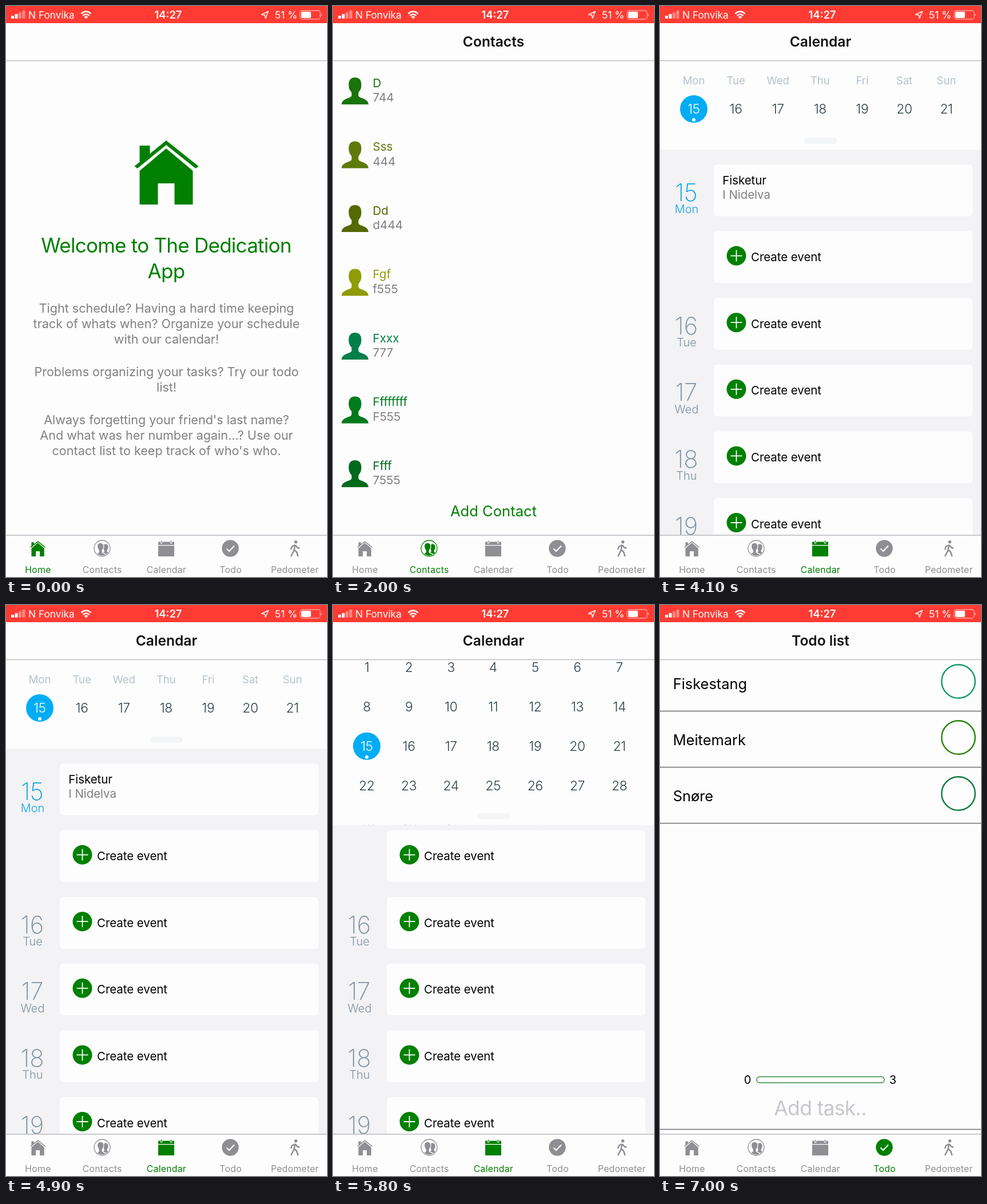
Recreate the animation shown at these times as an HTML page. Size 561 by 998 pixels, loop 8000 ms.

```html
<!DOCTYPE html>
<html lang="en">
<head>
<meta charset="utf-8">
<title>Phone app tour</title>
<style>
  html, body { margin: 0; width: 100%; height: 100%; overflow: hidden; background: #fff; }
  svg { display: block; width: 100vw; height: 100vh; }
  text { font-family: Inter, Roboto, sans-serif; font-optical-sizing: none; white-space: pre; }
</style>
</head>
<body>
<svg id="stage" viewBox="0 0 561 998"></svg>
<script>
const GREEN = '#008000', GREY = '#8e8e93', BLUE = '#00adf5', WHITE = '#fefdfe', RULE = '#6d6d72';
const LOOP = 8000, STEP = 100;
const DAYS = ['Mon', 'Tue', 'Wed', 'Thu', 'Fri', 'Sat', 'Sun'];

const text = (s, x, y, size, fill, { anchor = 'start', weight = 400, spacing = 0 } = {}) =>
  `<text x="${x}" y="${y}" font-size="${size}" fill="${fill}" text-anchor="${anchor}" font-weight="${weight}" letter-spacing="${spacing}">${s}</text>`;
const centered = (s, x, y, size, fill, options) => text(s, x, y, size, fill, { anchor: 'middle', ...options });
const rect = (x, y, w, h, fill, extra = '') =>
  `<rect x="${x}" y="${y}" width="${w}" height="${h}" fill="${fill}" ${extra}/>`;
const circle = (x, y, r, fill, extra = '') => `<circle cx="${x}" cy="${y}" r="${r}" fill="${fill}" ${extra}/>`;
const path = (d, fill, extra = '') => `<path d="${d}" fill="${fill}" ${extra}/>`;
const line = (d, stroke, width, extra = '') => path(d, 'none', `stroke="${stroke}" stroke-width="${width}" ${extra}`);
const place = (x, y, scale, content) => `<g transform="translate(${x} ${y}) scale(${scale})">${content}</g>`;
const group = (id, content) => `<g id="${id}">${content}</g>`;
const each = (list, draw) => list.map(draw).join('');
const range = n => [...Array(n).keys()];

const house = fill => path('M0 45L55.500 0L112 45L107 49L55.500 8L5 49ZM9 9H27V24L9 38Z'
  + 'M9 53L55.500 14L102 53V112H70V75H41V112H9Z', fill);
const person = (fill, extra) => path('M23.500 0C15 0 12 6 12.500 14c.3 6 2.500 9 5 12v6c-2 5-17 4-17.500 15h47'
  + 'c-.5-11-15.500-10-17.500-15v-6c2.500-3 4.700-6 5-12C35 6 32 0 23.500 0z', fill, extra);

function statusBar() {
  const bars = each(range(4), i => {
    const h = 5 + i * 3;
    return rect(9 + i * 6.5, 22 - h, 5, h, '#fff', `rx="1" opacity="${i < 2 ? 1 : 0.4}"`);
  });
  const wifi = line('M131.500 13.500Q140 5.500 148.500 13.500M134.500 17Q140 12 145.500 17', '#fff', 2.5)
    + path('M136.500 19Q140 16 143.500 19L140 22.500Z', '#fff');
  const battery = rect(514, 8, 35, 15, 'none', 'rx="4" stroke="#fff" stroke-opacity=".55" stroke-width="1.3"')
    + rect(516, 10, 17, 11, '#fff', 'rx="2"') + path('M550.500 13q3 2.500 0 5z', '#fff', 'opacity=".6"');
  return rect(0, 0, 561, 30, '#ff3b33') + bars + wifi + battery
    + line('M446.500 15L458.500 9.500L453.500 21.500L452.500 16Z', '#fff', 1.4, 'stroke-linejoin="round"')
    + text('N Fonvika', 39, 22, 17.3, '#fff')
    + centered('14:27', 283.5, 22, 18.4, '#fff', { weight: 600 })
    + text('51 %', 470, 22, 17.3, '#fff');
}

function home() {
  const body = [
    [536, 'Tight schedule? Having a hard time keeping'],
    [563, 'track of whats when? Organize your schedule'],
    [590, 'with our calendar!'],
    [647, 'Problems organizing your tasks? Try our todo'],
    [674, 'list!'],
    [731, "Always forgetting your friend's last name?"],
    [758, 'And what was her number again...? Use our'],
    [785, "contact list to keep track of who's who."],
  ];
  const heading = { spacing: -0.75 };
  return place(224.5, 235, 1, house(GREEN))
    + centered('Welcome to The Dedication', 280, 431, 35, GREEN, heading)
    + centered('App', 280, 476, 35, GREEN, heading)
    + each(body, ([y, s]) => centered(s, 280.5, y, 21.55, '#808080'));
}

function contacts() {
  const people = [
    ['D', '744', '#1a730b'], ['Sss', '444', '#5e7a0a'], ['Dd', 'd444', '#566800'],
    ['Fgf', 'f555', '#8f9c08'], ['Fxxx', '777', '#008048'], ['Ffffffff', 'F555', '#007a1c'],
    ['Ffff', '7555', '#006a1c'],
  ];
  return each(people, ([name, number, color], i) => place(0, 125 + i * 111.5, 1,
      place(15, 0, 1, person(color)) + text(name, 69.5, 16.5, 20.6, color) + text(number, 69.5, 42, 20.6, '#808080')))
    + centered('Add Contact', 280.5, 891.5, 25.6, GREEN);
}

function agenda() {
  const dayLabel = (date, name, color) =>
    centered(date, 46, 63.5, 42, color, { weight: 200 }) + centered(name, 46.5, 85, 20, color, { weight: 300 });
  const createEvent = circle(133.5, 43, 17, GREEN) + line('M123.500 43h20M133.500 33v20', '#fff', 1.8)
    + text('Create event', 159, 52.5, 20.4, '#000');
  const fishing = text('Fisketur', 109.2, 34.5, 20.4, '#000') + text('I Nidelva', 109.2, 60, 20.4, '#808080');
  const labels = [0, null, 1, 2, 3, 4];
  return rect(0, 96, 561, 830, '#f3f2f5') + each(labels, (day, i) => place(0, 277 + i * 116.6, 1,
    rect(94, 0, 452, 90.5, WHITE, 'rx="6"') + (i ? createEvent : fishing)
    + (day === null ? '' : dayLabel(15 + day, DAYS[day], day ? '#7d929f' : '#0ea7e0'))));
}

function monthPanel() {
  const column = i => 59 + i * 73.6;
  const weekdays = y => each(DAYS, (d, i) => centered(d, column(i), y, 18.5, '#b6c1cd'));
  const dates = each(range(35), i => {
    const x = column(i % 7), y = 180 + (Math.floor(i / 7) - 2) * 68.8, today = i === 14;
    const color = today ? '#fff' : i < 31 ? '#2d4048' : '#d9e1e8';
    return (today ? circle(x, y, 24, BLUE) + circle(x, y + 19, 3, '#fff') : '')
      + centered(i % 31 + 1, x, y + 8.3, 22.8, color, { weight: 300, spacing: -0.3 });
  });
  return `<clipPath id="panelClip"><rect id="panelArea" x="0" y="96" width="561" height="155"/></clipPath>
    <g clip-path="url(#panelClip)">${rect(0, 96, 561, 830, WHITE)}
      ${group('month', weekdays(-7.5) + dates)}
      ${group('weekBar', rect(0, 96, 561, 54, WHITE) + weekdays(137))}
      ${group('knob', rect(0, 215, 561, 37, WHITE) + rect(252, 230.5, 57, 10.5, '#f2f4f5', 'rx="5" id="handle"'))}
    </g>`;
}

function todo() {
  const tasks = [['Fiskestang', '#109a6c'], ['Meitemark', '#258208'], ['Snøre', '#0a7a3c']];
  return each(tasks, ([name, color], i) => place(0, 98 * i, 1,
      text(name, 22.7, 146.5, 25.4, '#000')
      + circle(521.5, 133.5, 29.3, 'none', `stroke="${color}" stroke-width="2.4"`)
      + line('M0 185.500H561', RULE, 1.5)))
    + centered('0', 153, 837, 20, '#000') + centered('3', 407, 837, 20, '#000')
    + rect(169, 824.5, 223, 10.5, 'none', 'rx="5" stroke="#2f8a3a" stroke-width="1.4"')
    + centered('Add task..', 280, 892, 35.5, '#c7c7cd', { spacing: -0.7 })
    + line('M0 916.500H561', RULE, 1.5);
}

function tabBar() {
  const ink = 'currentColor';
  const icons = [
    place(42.3, 935, 0.24, house(ink)),
    `<clipPath id="badge">${circle(168, 948, 12.6, '#000')}</clipPath>`
      + circle(168, 948, 14, 'none', `stroke="${ink}" stroke-width="1.3"`)
      + `<g clip-path="url(#badge)">${place(164.5, 940.5, 0.41, person(ink))}
        ${place(153, 938, 0.52, person(ink, 'stroke="#fff" stroke-width="2.500"'))}</g>`,
    rect(266, 936.5, 28, 5.5, ink) + rect(266, 943.3, 28, 18.7, ink)
      + line('M271.500 934.500v5M288.500 934.500v5', '#fff', 3.4) + line('M271.500 934.500v4M288.500 934.500v4', ink, 1.6),
    circle(392, 948, 14.7, ink) + line('M385.500 948.500L390 953L399 943.500', '#fff', 2.2),
    circle(506.5, 936.7, 2.7, ink) + line('M505 942L503.500 951L498 962M503.500 950L508 954.500L510.500 962'
      + 'M505 942L499.500 945L498 950M505.500 942L509 946.500L513 948', ink, 2.5, 'stroke-linejoin="round"'),
  ];
  const names = ['Home', 'Contacts', 'Calendar', 'Todo', 'Pedometer'];
  return rect(0, 925, 561, 73, WHITE) + line('M0 925H561', '#b9b9bd', 1.5)
    + each(names, (name, i) => group('tab' + i,
      icons[i] + centered(name, 56 + i * 112.2, 990.5, 15.8, ink, { spacing: 0.25 })));
}

const screens = [
  { start: 0, title: '', content: home() },
  { start: 1900, title: 'Contacts', content: contacts() },
  { start: 3900, title: 'Calendar', content: agenda() + rect(0, 96, 561, 155, '#e9e7ee') + group('panel', monthPanel()) },
  { start: 7000, title: 'Todo list', content: todo() },
];

const byId = id => document.getElementById(id);
byId('stage').innerHTML = rect(0, 0, 561, 998, WHITE)
  + each(screens, (s, i) => group('screen' + i,
    s.content + centered(s.title, 280.5, 70.5, 24.6, '#111', { weight: 600 })))
  + line('M0 95.500H561', '#bdbdc1', 1.5) + tabBar() + statusBar();

// The month panel is pulled down, then springs back.
function pullDistance(t) {
  const open = 267;
  if (t <= 5300 || t >= 6000) return 0;
  if (t <= 5600) return open * Math.sin((t - 5300) / 300 * Math.PI / 2) ** 2;
  return open * Math.cos((t - 5600) / 400 * Math.PI / 2) ** 2;
}

function draw(now) {
  const t = Math.floor(now % LOOP / STEP) * STEP;
  const current = screens.findLastIndex(s => t >= s.start);
  screens.forEach((_, i) => byId('screen' + i).setAttribute('display', i === current ? 'inline' : 'none'));
  range(5).forEach(i => byId('tab' + i).setAttribute('color', i === current ? GREEN : GREY));

  const pull = pullDistance(t);
  const shift = (id, y) => byId(id).setAttribute('transform', `translate(0 ${y})`);
  byId('panel').setAttribute('display', t >= 4000 ? 'inline' : 'none');
  byId('panelArea').setAttribute('height', 155 + pull);
  shift('month', pull / 2);
  shift('weekBar', -pull);
  shift('knob', pull);
  byId('weekBar').setAttribute('opacity', Math.max(0, 1 - pull / 155));
  byId('handle').setAttribute('opacity', 1 - pull / 267 * 0.4);
}

const begin = performance.now();
function tick() {
  draw(performance.now() - begin);
  requestAnimationFrame(tick);
}
tick();
</script>
</body>
</html>
```
